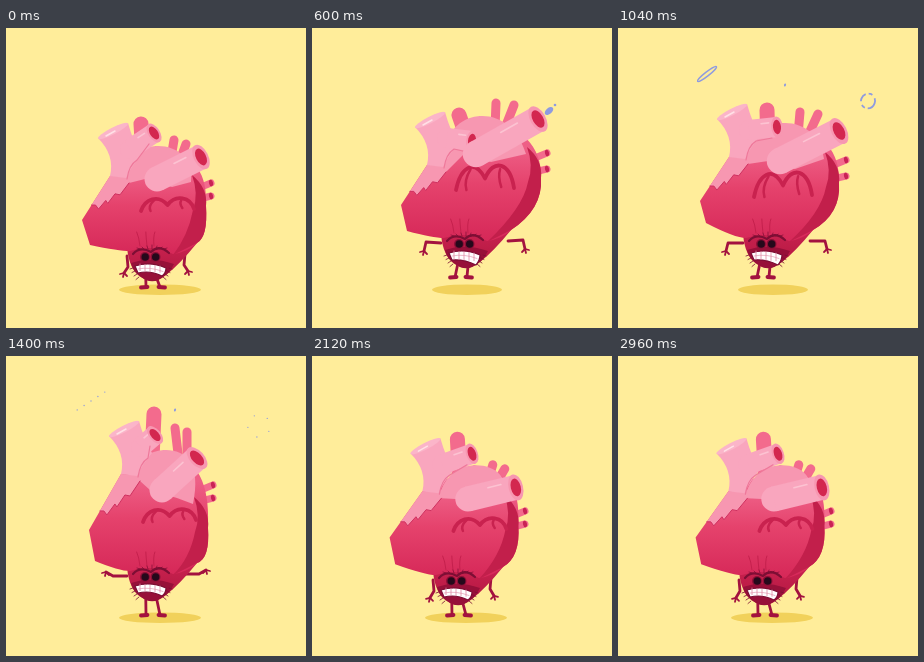
These frames come from a looping animation (300 by 300 pixels, 3 s). An HTML page:

```html
<!DOCTYPE html>
<html lang="en">
<head>
<meta charset="utf-8">
<title>Beating heart</title>
<style>
html,body{margin:0;width:100%;height:100%;overflow:hidden;background:#ffed9a}
svg{display:block;width:100vw;height:100vh}
path{stroke-linecap:round;stroke-linejoin:round}
</style>
</head>
<body>
<svg viewBox="0 0 300 300">
<defs>
<linearGradient id="flesh" x1="0" y1="0" x2="0" y2="1">
<stop offset=".25" stop-color="#ee5f86"/><stop offset=".55" stop-color="#e5426c"/><stop offset="1" stop-color="#d62858"/>
</linearGradient>
<linearGradient id="tip" x1="0" y1="0" x2="0" y2="1">
<stop offset="0" stop-color="#c92250"/><stop offset="1" stop-color="#b2173f"/>
</linearGradient>
</defs>
<g id="stage"></g>
</svg>
<script>
const LOOP = 3000, STEP = 40, BEAT = 280;
const PINK = '#f9a6be', ROSE = '#f797b1', STUB = '#f36b8d', SHADE = '#c21f4b';
const DARK = '#a3123f', MAROON = '#7d0e34', BLUE = '#8f9be0';
const stage = document.getElementById('stage');

// Point pairs: left corner, lower corner, face, right side, aorta, branch,
// front mouth, front base, dome, back stub, thin stub, side stub; then elbow, hand, lift.
const squat = [76,192, 84,217, 145,229, 200,178, 107,103, 148,105, 195,129, 151,151, 150,118, 135,96, 168,112, 205,155, 1,11, -3,17, 0];
const right = [89,177, 95,203, 153,216, 229,150, 118,92, 160,113, 226,91, 164,126, 168,88, 147,87, 184,75, 235,125, -15,-1, -17,8, 1];
const hover = [82,173, 88,195, 149,216, 221,155, 114,84, 159,99, 221,103, 162,133, 165,95, 149,82, 182,84, 228,132, -15,0, -17,8, 1];
const tall = [83,174, 89,205, 145,221, 202,172, 118,73, 149,79, 191,102, 156,134, 158,94, 148,58, 169,72, 207,129, -14,0, -21,-4, 0];
const plump = [78,179, 83,206, 145,224, 208,168, 115,87, 163,96, 206,132, 157,141, 165,107, 148,80, 184,108, 215,155, 1,11, -3,18, 0];

const mix = (a, b, k) => a.map((v, i) => v + (b[i] - v) * k);
const lean = (pose, dx) => pose.map((v, i) => i < 24 && i % 2 === 0 ? v + dx * (240 - pose[i + 1]) / 140 : v);
const clamp = v => Math.max(0, Math.min(1, v));

const pulse = [0, .1, .5, .95, 1.1, 1, .8, 0];
function beat(time) {
  const p = (time % BEAT) / STEP, i = Math.floor(p);
  return mix(squat, plump, pulse[i] + (pulse[i + 1] - pulse[i]) * (p - i));
}

const track = [
  [320, beat(320)], [440, lean(squat, -24)], [520, mix(squat, plump, .7)],
  [560, mix(plump, right, .7)], [600, right], [680, mix(right, hover, .3)],
  [840, lean(hover, -20)], [1040, hover], [1160, mix(hover, tall, .3)],
  [1280, mix(tall, plump, .3)], [1400, tall], [1520, squat], [1640, mix(squat, plump, 1.1)], [1720, plump]
];

function poseAt(t) {
  if (t < 320) return beat(t);
  if (t >= 1720) return beat(t + 80);
  const i = track.findIndex(k => k[0] > t), [t0, a] = track[i - 1], [t1, b] = track[i];
  const k = (t - t0) / (t1 - t0);
  return mix(a, b, k * k * (3 - 2 * k));
}

const at = (p, dx = 0, dy = 0) => `${(p.x + dx).toFixed(2)} ${(p.y + dy).toFixed(2)} `;
const off = (p, x, y) => ({x: p.x + x, y: p.y + y});
const between = (a, b, k) => ({x: a.x + (b.x - a.x) * k, y: a.y + (b.y - a.y) * k});
const fill = (d, color, extra = '') => `<path d="${d}" fill="${color}" ${extra}/>`;
const pen = (d, color, w) => `<path d="${d}" fill="none" stroke="${color}" stroke-width="${w}"/>`;
const line = (a, b, color, w) => pen(`M${at(a)}L${at(b)}`, color, w);
const oval = (p, rx, ry, color, turn = 0, extra = '') =>
  `<ellipse rx="${rx}" ry="${ry}" fill="${color}" transform="translate(${p.x} ${p.y}) rotate(${turn})" ${extra}/>`;

function tube(base, mouth, w) {
  const dx = mouth.x - base.x, dy = mouth.y - base.y, len = Math.hypot(dx, dy);
  const turn = Math.atan2(dy, dx) * 180 / Math.PI, nx = -dy / len * w / 2, ny = dx / len * w / 2;
  const shine = off(between(base, mouth, .45), -nx * .5, -ny * .5), end = off(between(base, mouth, .72), -nx * .5, -ny * .5);
  return oval(base, w / 2, w / 2, PINK) +
    fill(`M${at(base,nx,ny)}L${at(mouth,nx,ny)}L${at(mouth,-nx,-ny)}L${at(base,-nx,-ny)}Z`, PINK) +
    line(shine, end, '#fcc3d2', 1.6) +
    oval(mouth, w * .29, w * .53, ROSE, turn) + oval(mouth, w * .2, w * .36, '#d3274f', turn);
}

function drawArm(shoulder, elbow, hand, side) {
  const fingers = [[-4, 1], [-1, 4], [3, 3]].map(([x, y]) => line(hand, off(hand, x * side, y), DARK, 1.8)).join('');
  return pen(`M${at(shoulder)}L${at(elbow)}L${at(hand)}`, DARK, 2.8) + fingers;
}

function drawFace(f, lift) {
  const open = lift * 2, m = off(f, -1, 0);
  let s = fill(`M${at(f,-20,6)}Q${at(f,0,-1)}${at(f,23,7)}Q${at(f,18,17)}${at(f,13,19)}Q${at(f,2,29)}${at(f,-10,20)}Q${at(f,-18,15)}${at(f,-20,6)}Z`, '#971039');
  s += pen(`M${at(f,-18,-3)}Q${at(f,-11,-11)}${at(f,0,-5)}Q${at(f,8,-13)}${at(f,18,-4)}`, MAROON, 2.2);
  for (let i = -3; i < 4; i++) s += line(off(f, i * 4 + 1, -8), off(f, i * 5 + 1, -12 + Math.abs(i)), MAROON, .7);
  for (const x of [-6, 4.5]) s += oval(off(f, x, 0), 5, 5, '#8b0f36') + oval(off(f, x + .2, 0), 3.7, 3.8, '#25091b');
  s += fill(`M${at(m,-15,9)}Q${at(m,0,4)}${at(m,16,11)}Q${at(m,16,16)}${at(m,12,19 + open)}Q${at(m,0,13 + open)}${at(m,-12,16)}Z`, '#fff', `stroke="${MAROON}" stroke-width="1.2"`);
  for (let i = -2; i < 3; i++) s += line(off(m, i * 5, 8 + i * .5), off(m, i * 5, 14.5 + i * .4 + open * .7), '#e08aa4', .8);
  s += pen(`M${at(m,-12,12)}Q${at(m,0,9.5)}${at(m,13,14.5)}`, '#e08aa4', .6);
  for (const side of [-1, 1])
    for (let i = 0; i < 4; i++) s += line(off(f, side * (18 - i * 2), 11 + i * 3), off(f, side * (21 - i * 2), 12 + i * 3.5), MAROON, .8);
  return s;
}

function drawHeart(v) {
  const pts = Array.from({length: 12}, (_, i) => ({x: v[2 * i], y: v[2 * i + 1]}));
  const [corner, low, face, side, aorta, branch, mouth, base, dome, stub, thin, vein] = pts;
  const [ex, ey, hx, hy, lift] = v.slice(24);
  const neck = off(aorta, -3, 45), frill = between(corner, neck, .34), seam = off(neck, 19, 7);
  const shoulderL = off(face, -24, -1), shoulderR = off(face, 34 + lift * 9, -3);
  const footY = 259 - lift * 10, footX = face.x + 2 - lift * 6;
  let s = '';

  for (const x of [-7, 7]) {
    const foot = {x: footX + x * (1 - lift * .15), y: footY}, out = x < 0 ? -5 : 5;
    s += line(off(face, x * .75 - lift * 2, 20), foot, DARK, 2.8) + line(off(foot, out, .5), off(foot, -out * .3, 0), DARK, 3.8);
  }
  s += drawArm(shoulderL, off(shoulderL, ex, ey), off(shoulderL, hx, hy), 1);
  s += drawArm(shoulderR, off(shoulderR, -ex, ey), off(shoulderR, -hx, hy), -1);

  s += line(stub, off(between(aorta, dome, .7), 0, 15), STUB, 15);
  s += line(thin, off(dome, 15, 12), STUB, 9) + line(off(thin, 12 + lift * 6, 4 - lift * 2), off(dome, 23, 17), STUB, 9);
  for (const y of [0, 13 + lift * 3]) {
    const end = off(vein, 0, y);
    s += line(off(end, -17, 7 - y * .2), end, STUB, 7) + oval(end, 2, 3.2, '#c92354', -12);
  }

  s += fill(`M${at(face,-24,-10)}Q${at(face,-22,13)}${at(face,-10,20)}Q${at(face,2,29)}${at(face,15,18)}Q${at(face,29,7)}${at(face,46,-14)}Z`, 'url(#tip)');
  s += fill(`M${at(corner)}L${at(low)}Q${at(face,-32,-6)}${at(face,-21,-6)}Q${at(face,0,-13)}${at(face,22,-3)}` +
    `Q${at(face,37,-5)}${at(face,46,-14)}Q${at(side,2,31)}${at(side)}C${at(side,1,-32)}${at(dome,42,10)}${at(dome)}L${at(neck)}Z`, 'url(#flesh)');
  s += fill(`M${at(side,-14,-31)}Q${at(side,2,-18)}${at(side)}Q${at(side,2,31)}${at(face,46,-14)}L${at(face,22,-2)}Q${at(side,-18,30)}${at(side,-13,4)}Q${at(side,-7,-12)}${at(side,-14,-31)}Z`, SHADE);
  for (const x of [-11, -4, 3]) s += pen(`M${at(face,x,-11)}Q${at(face,x - 1,-20)}${at(face,x * 1.3,-25)}`, SHADE, .9);

  // Dome and frilled edge
  const f1 = between(frill, seam, .3), f2 = between(frill, seam, .6);
  const edge = `${at(frill)}L${at(frill,4,0)}L${at(frill,7,4)}L${at(f1,3,2)}L${at(f1,5,5)}L${at(f2,1,2)}L${at(f2,6,3)}L${at(seam)}`;
  s += fill(`M${at(neck)}L${edge}L${at(base,-12,0)}L${at(base,15,8)}L${at(side,-15,-24)}C${at(dome,38,12)}${at(dome,20,-1)}${at(dome)}Q${at(dome,-24,2)}${at(dome,-33,25)}Z`, ROSE);
  s += pen(`M${edge}`, '#cf3160', 1);

  // Aorta with its side branch
  const rimL = off(aorta, -15, 7), rimR = off(aorta, 15, -8);
  s += fill(`M${at(rimL)}Q${at(aorta,2,24)}${at(neck)}L${at(seam,-3,-5)}Q${at(aorta,18,36)}${at(aorta,28,24)}Q${at(aorta,20,10)}${at(rimR)}Z`, PINK);
  s += tube(off(aorta, 17, 18), branch, 20);
  s += oval(aorta, 16.7, 3.3, '#fbb5c9', -27) + line(off(aorta, -7, 5), off(aorta, 2, 0), '#ffe0e6', 1.5);
  s += pen(`M${at(seam,-2,-4)}Q${at(aorta,16,34)}${at(aorta,24,29)}L${at(branch,-5,11)}`, '#ee789a', 1.2);

  // Folds below the front tube
  const w = 53 + lift * 5, h = .6 + lift * .55, fold = {x: side.x - 65 - lift * 20, y: base.y + 32 + lift * 4};
  s += pen(`M${at(fold)}C${at(fold,w * .08,-20 * h)}${at(fold,w * .32,-28 * h)}${at(fold,w * .5,-10 * h)}C${at(fold,w * .65,-28 * h)}${at(fold,w * .93,-24 * h)}${at(fold,w,-2)}`, '#c9224f', 3.8);
  s += pen(`M${at(fold,w * .25,-18 * h)}Q${at(fold,w * .13,-8 * h)}${at(fold,w * .18,0)}M${at(fold,w * .76,-18 * h)}Q${at(fold,w * .72,-12 * h)}${at(fold,w * .78,-3)}`, '#c9224f', 2.5);
  s += tube(base, mouth, 25 + lift * 1.5);
  return s + drawFace(face, lift);
}

function specks(x, y, age, flat) {
  const r = 7 + age * .015;
  return [0, 1, 2, 3, 4].map(i => {
    const a = i * 1.26 + .5;
    const p = flat ? {x: x + (i - 2) * r * .65, y: y - (i - 2) * r * .42} : {x: x + Math.cos(a) * r, y: y + Math.sin(a) * r};
    return oval(p, 1 - age / 800, 1 - age / 800, BLUE);
  }).join('');
}

function drawSpray(t) {
  let s = '';
  if (t >= 600 && t < 760) {
    const k = (t - 600) / 160, p = {x: 237 + k * 12, y: 83 - k * 9};
    s += oval(p, 5, 3, BLUE, -40) + oval(off(p, 6, -6), 1.3, 1.3, BLUE);
  } else if (t >= 760 && t < 1120) {
    s += oval({x: 250, y: 73}, 7, 7.5, 'none', 20, `stroke="${BLUE}" stroke-width="1.8" stroke-dasharray="${t < 920 ? '40 3' : '9 3 4 4'}"`);
  } else if (t >= 1120 && t < 1600) s += specks(253, 70, t - 1120, false);
  if (t >= 840 && t < 1160) {
    const k = clamp((t - 840) / 200);
    s += oval({x: 92 - k * 3, y: 68 - k * 22}, 4 + k * 8, 3.2 - k * 1.2, k < .5 ? BLUE : 'none', -38, `stroke="${BLUE}" stroke-width="1.5"`);
  } else if (t >= 1160 && t < 1680) s += specks(85, 45, t - 1160, true);
  if (t >= 960 && t < 1440) s += oval({x: 167 + (t - 1040) / 180, y: 57 - (t - 1040) / 120}, 1, 1.6, BLUE, 15);
  return s;
}

function render(time) {
  const t = Math.floor((time % LOOP) / STEP) * STEP, pose = poseAt(t), lift = pose[28];
  stage.innerHTML = oval({x: 154 + lift, y: 261.7}, 41 - 6 * lift, 5.3, '#f1d15b') + drawHeart(pose) + drawSpray(t);
}

const start = performance.now();
function tick() {
  render(performance.now() - start);
  requestAnimationFrame(tick);
}
tick();
</script>
</body>
</html>
```
